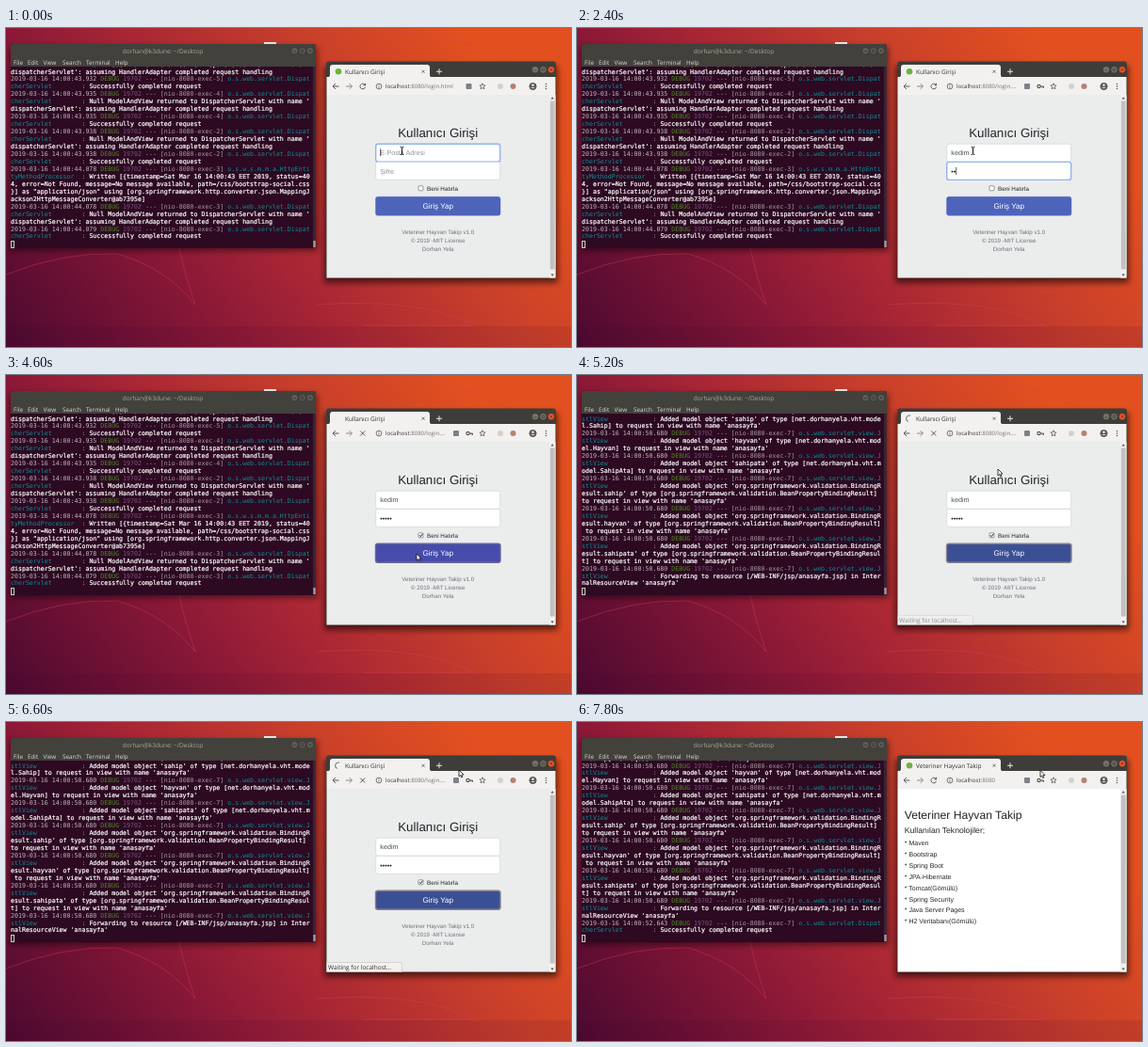
Animation of 600x339 px, one loop 8000 ms. Source, as an HTML page:

```html
<!DOCTYPE html>
<html lang="tr">
<head>
<meta charset="utf-8">
<title>Kullanıcı Girişi</title>
<style>
html, body { margin: 0; width: 100%; height: 100%; overflow: hidden; background: #8c1a3c; }
svg { position: absolute; left: 0; top: 0; width: 600px; height: 339px; }
text { font-family: "Liberation Sans", Arial, sans-serif; fill: #212529; white-space: pre; text-rendering: geometricPrecision; }
.ui { font-family: "Open Sans", "Noto Sans", sans-serif; font-size: 6.5px; fill: #33322f; }
.menu { font-size: 6.3px; fill: #dfdbd2; }
.mid { text-anchor: middle; }
.field { font-size: 7.2px; fill: #495057; }
.foot { font-size: 6.2px; fill: #6c757d; text-anchor: middle; }
.list { font-size: 7px; }
.line { fill: none; stroke: #5a5954; stroke-width: 1; }
#term { position: absolute; left: 5px; top: 41px; width: 321px; height: 193px; overflow: hidden; }
#log { position: absolute; left: 0; bottom: -.4px; margin: 0; color: #fff;
  font: 6.6px/7.95px "DejaVu Sans Mono", "Liberation Mono", monospace; white-space: pre;
  text-rendering: geometricPrecision; }
.msg { -webkit-text-stroke: .2px #fff; }
.time { color: #c3b7be; }
.lv { color: #4f8a25; }
.pid { color: #7d5580; }
.dim { color: #a79aa2; }
.src { color: #0a8f92; }
#log i { display: inline-block; box-sizing: border-box; width: 4px; height: 7.9px; border: .8px solid #ccc; vertical-align: top; }
</style>
</head>
<body>
<svg viewBox="0 0 600 339">
  <defs>
    <linearGradient id="wall" gradientUnits="userSpaceOnUse" x1="0" y1="339" x2="480" y2="0">
      <stop offset="0" stop-color="#4c0930"/>
      <stop offset=".33" stop-color="#8a1837"/>
      <stop offset=".5" stop-color="#a72535"/>
      <stop offset=".75" stop-color="#c73e2b"/>
      <stop offset="1" stop-color="#e2501f"/>
    </linearGradient>
    <filter id="soft" x="-10%" y="-10%" width="120%" height="125%"><feGaussianBlur stdDeviation="3"/></filter>
  </defs>

  <rect width="600" height="339" fill="url(#wall)"/>
  <rect y="317" width="600" height="22" fill="#40002a" opacity=".1"/>
  <g fill="none" stroke="#d8405a" stroke-opacity=".4">
    <path d="M0 262Q60 238 118 240Q170 255 201 294Q190 262 184 234"/>
    <path d="M330 294Q440 286 497 316H380"/>
    <path d="M400 2Q540 8 596 95"/>
  </g>
  <rect x="274" y="15" width="13" height="3" fill="#eee"/>

  <!-- terminal window -->
  <rect x="4" y="20" width="327" height="217" fill="#000" opacity=".45" filter="url(#soft)"/>
  <path d="M5 234V20q0-3 3-3H326q3 0 3 3V234Z" fill="#2d0922"/>
  <path d="M5 41V20q0-3 3-3H326q3 0 3 3V41Z" fill="#42413c"/>
  <rect x="326" y="41" width="3" height="193" fill="#3d2434"/>
  <rect x="326.3" y="226" width="2.4" height="7" fill="#a39aa0"/>
  <text class="ui mid" x="166.500" y="26.500" style="fill:#aaa69c">dorhan@k3dune: ~/Desktop</text>
  <g fill="#5f5d56" stroke="#2f2e2a" stroke-width=".6">
    <circle cx="306.500" cy="24.200" r="3.700"/><circle cx="314.800" cy="24.200" r="3.700"/><circle cx="323" cy="24.200" r="3.700"/>
  </g>
  <path d="M305 24.700h3M313.500 22.900h2.600v2.600h-2.600zM321.800 23l2.400 2.400m0-2.400l-2.400 2.400" fill="none" stroke="#33322e" stroke-width=".7"/>
  <g>
    <text class="ui menu" x="8" y="38.800">File</text><text class="ui menu" x="23" y="38.800">Edit</text>
    <text class="ui menu" x="39.500" y="38.800">View</text><text class="ui menu" x="60" y="38.800">Search</text>
    <text class="ui menu" x="85" y="38.800">Terminal</text><text class="ui menu" x="116" y="38.800">Help</text>
  </g>

  <!-- browser window -->
  <rect x="338" y="40" width="248" height="231" fill="#000" opacity=".55" filter="url(#soft)"/>
  <path d="M340 266V38.500q0-3 3-3H581q3 0 3 3V266Z" fill="#3e3d39"/>
  <path d="M341 52.500q3 0 3-3V42q0-3 3-3H447q3 0 3 3v7.500q0 3 3 3Z" fill="#f2f1f0"/>
  <rect x="340.500" y="52" width="243" height="19" fill="#f2f1f0"/>
  <circle id="fav" cx="353" cy="46.300" r="3.300" fill="#6db33f"/>
  <path id="spin" d="M353 43A3.300 3.300 0 0 0 353 49.600" fill="none" stroke="#6f7277" stroke-width="1"/>
  <text class="ui" id="tab" x="360" y="48.600"></text>
  <path class="line" d="M441.500 44.800l3 3m0-3l-3 3" style="stroke-width:.8"/>
  <path d="M457 46.300h6M460 43.300v6" stroke="#e8e6e2" stroke-width="1"/>
  <g fill="#77746c" stroke="#2b2a27" stroke-width=".6">
    <circle cx="562" cy="44.300" r="3.700"/><circle cx="570.500" cy="44.300" r="3.700"/>
    <circle cx="579" cy="44.300" r="3.700" fill="#e9562a"/>
  </g>
  <path d="M560.500 45h3M569.200 43h2.600v2.600h-2.600zM577.800 43.100l2.400 2.400m0-2.400l-2.400 2.400" fill="none" stroke="#33322e" stroke-width=".7"/>

  <path class="line" d="M353.500 62h-6.500m2.900-2.900l-2.900 2.900l2.900 2.900"/>
  <path class="line" d="M361 62h6.500m-2.900-2.900l2.900 2.900l-2.900 2.900" style="stroke:#8c8b87"/>
  <g id="reload"><path class="line" d="M380.700 60A2.800 2.800 0 1 0 381.500 62.800"/><path d="M382 58.200v3h-3Z" fill="#5a5954"/></g>
  <path id="stop" class="line" d="M376.200 59.500l5 5m0-5l-5 5"/>
  <circle class="line" cx="396" cy="62" r="2.900" style="stroke-width:.8"/>
  <path class="line" d="M396 61.600v2M396 60v.8" style="stroke-width:.8"/>
  <text class="ui" x="403" y="64.300" style="font-size:6.1px">localhost<tspan id="path" fill="#74736f"></tspan></text>
  <rect id="trans" y="59" width="6" height="6" rx="1" fill="#7d8288"/>
  <g id="key"><circle class="line" cx="490.500" cy="62" r="1.600" style="stroke-width:1.200"/><path class="line" d="M492 62h3.500v1.800M494 62v1.500"/></g>
  <path d="M506 58.800l.9 2.100 2.200.2-1.700 1.500.5 2.200-1.900-1.200-1.900 1.200.5-2.200-1.700-1.500 2.200-.2Z" fill="none" stroke="#5a5954" stroke-width=".8"/>
  <circle cx="525" cy="62" r="3" fill="#d3d1ce"/>
  <circle cx="538.500" cy="62" r="3" fill="#b8806c"/>
  <circle class="line" cx="559.500" cy="62" r="3.600" style="fill:#5a5954"/>
  <circle cx="559.500" cy="60.800" r="1.200" fill="#f2f1f0"/><path d="M557.200 64q2.300-2.200 4.600 0Z" fill="#f2f1f0"/>
  <g fill="#5a5954"><circle cx="573.500" cy="59.500" r=".8"/><circle cx="573.500" cy="62" r=".8"/><circle cx="573.500" cy="64.500" r=".8"/></g>

  <rect id="page" x="340.500" y="71" width="243" height="194.500"/>
  <rect x="577" y="71" width="6.500" height="194.500" fill="#f1f1f1"/>
  <rect x="577.800" y="77.500" width="4.900" height="179" fill="#c1c1c1"/>
  <path d="M578.500 75.500l1.700-2.200 1.700 2.200ZM578.500 261.500l1.700 2.200 1.700-2.200Z" fill="#55534f"/>

  <g id="login">
    <text class="mid" x="458.700" y="115.800" font-size="13.300">Kullanıcı Girişi</text>
    <rect class="box" x="392.700" y="123.200" width="132" height="19" rx="2.500" fill="#fff"/>
    <rect class="box" x="392.700" y="142.400" width="132" height="19" rx="2.500" fill="#fff"/>
    <text class="field" id="user" x="397.300" y="134.700"></text>
    <text class="field" id="pass" x="397.300" y="154.500"></text>
    <rect id="caret" width=".8" height="8" fill="#333"/>
    <rect x="438" y="167.800" width="5" height="5" rx=".7" fill="#fff" stroke="#6d7073" stroke-width=".7"/>
    <path id="tick" d="M439 170.300l1.300 1.400 2.100-3" fill="none" stroke="#222" stroke-width="1"/>
    <text x="447" y="172.600" font-size="6.300">Beni Hatırla</text>
    <rect id="btn" x="392.500" y="179.300" width="132.500" height="20" rx="2.500"/>
    <text class="mid" x="458.700" y="192.300" font-size="8.100" style="fill:#fff">Giriş Yap</text>
    <text class="foot" x="458.700" y="219.300">Veteriner Hayvan Takip v1.0</text>
    <text class="foot" x="458.700" y="228.200">© 2019 -MIT License</text>
    <text class="foot" x="458.700" y="237.200">Dorhan Yela</text>
    <g id="drop">
      <rect x="392.500" y="144.500" width="132.500" height="22" fill="#000" opacity=".3" filter="url(#soft)"/>
      <rect x="392.500" y="143.500" width="132.500" height="21.500" rx="1" fill="#fff"/>
      <text class="ui" x="397.300" y="156.800" style="font-weight:700;font-size:7px">kedim</text>
    </g>
    <g id="wait">
      <path d="M340.500 265.500V255.500h78q2 0 2 2V265.500Z" fill="#f2f1f0" stroke="#c4c2be" stroke-width=".6"/>
      <text class="ui" x="342" y="263.200">Waiting for localhost…</text>
    </g>
  </g>

  <g id="home">
    <text x="347.800" y="103.300" font-size="12.150">Veteriner Hayvan Takip</text>
    <text x="347.800" y="118.200" font-size="8.600">Kullanılan Teknolojiler;</text>
  </g>

  <path id="beam" d="M-1.800-4q1.800 0 1.800 1V3q0 1-1.800 1M1.800-4q-1.800 0-1.800 1M1.800 4q-1.800 0-1.800-1" fill="none" stroke="#111" stroke-width="1"/>
  <path id="arrow" d="M0 0V7L1.600 5.500 2.700 8 3.900 7.500 2.800 5.100 5 5Z" fill="#fff" stroke="#111" stroke-width=".8"/>
</svg>
<div id="term"><pre id="log"></pre></div>

<script>
const $ = id => document.getElementById(id);
const LOOP = 8000, TICK = 200, COLS = 80;
const NAME = 'kedim';

// ---- terminal log
const entry = (time, thread, logger, msg) => [
  ['time', `2019-03-16 14:00:${time} `], ['lv', 'DEBUG '], ['pid', '19702 '],
  ['dim', `--- [nio-8080-exec-${thread}] `], ['src', logger.padEnd(40)], ['dim', ' : '], ['msg', msg]
];
function render(parts) {
  let col = 0;
  return parts.map(([cls, text]) => {
    let out = '';
    for (const ch of text) {
      if (col === COLS) { out += '\n'; col = 0; }
      out += ch;
      col++;
    }
    return `<span class="${cls}">${out}</span>`;
  }).join('') + '\n';
}
const servlet = 'o.s.web.servlet.DispatcherServlet';
const done = (time, n) => entry(time, n, servlet, 'Successfully completed request');
const empty = (time, n) => entry(time, n, servlet, "Null ModelAndView returned to DispatcherServlet " +
  "with name 'dispatcherServlet': assuming HandlerAdapter completed request handling");
const view = msg => entry('50.680', 7, 'o.s.web.servlet.view.JstlView', msg);
const added = (name, type) => view(`Added model object '${name}' of type [${type}] to request in view with name 'anasayfa'`);

const models = ['Sahip', 'Hayvan', 'SahipAta'];
const valid = 'org.springframework.validation.';
const before = [
  empty('43.932', 5), done('43.932', 5), empty('43.935', 4), done('43.935', 4),
  empty('43.938', 2), done('43.938', 2),
  entry('44.078', 3, 'o.s.w.s.m.m.a.HttpEntityMethodProcessor',
    'Written [{timestamp=Sat Mar 16 14:00:43 EET 2019, status=404, error=Not Found, ' +
    'message=No message available, path=/css/bootstrap-social.css}] as "application/json" using ' +
    '[org.springframework.http.converter.json.MappingJackson2HttpMessageConverter@ab7395e]'),
  empty('44.078', 3), done('44.079', 3)
];
const posted = [
  ...models.map(m => added(m.toLowerCase(), 'net.dorhanyela.vht.model.' + m)),
  ...models.map(m => added(`${valid}BindingResult.${m.toLowerCase()}`, valid + 'BeanPropertyBindingResult')),
  view("Forwarding to resource [/WEB-INF/jsp/anasayfa.jsp] in InternalResourceView 'anasayfa'")
];
const logs = [before, posted, [...posted, done('52.643', 7)]]
  .map(list => list.map(render).join('') + '<i></i>');

// ---- home page list
['Maven', 'Bootstrap', 'Spring Boot', 'JPA-Hibernate', 'Tomcat(Gömülü)', 'Spring Security',
  'Java Server Pages', 'H2 Veritabanı(Gömülü)'].forEach((item, i) => {
  const row = document.createElementNS('http://www.w3.org/2000/svg', 'text');
  row.setAttribute('class', 'list');
  row.setAttribute('x', 347.8);
  row.setAttribute('y', 131 + i * 11.9);
  row.textContent = '* ' + item;
  $('home').append(row);
});

// ---- pointer path: time, x, y
const route = [
  [0, 420.5, 130.5], [3400, 420.5, 130.5], [3800, 439, 168], [4000, 439, 168], [4400, 436, 190],
  [4800, 436, 190], [5000, 441, 150], [5200, 447, 100], [5600, 460, 78], [6000, 472, 62],
  [6600, 481, 51], [7000, 482, 51], [7800, 492, 51.5], [LOOP, 492, 51.5]
];
function pointer(t) {
  const i = route.findIndex(p => p[0] > t);
  const [a, b] = [route[i - 1], route[i]];
  const k = (t - a[0]) / (b[0] - a[0]);
  return [a[1] + (b[1] - a[1]) * k, a[2] + (b[2] - a[2]) * k];
}

const clamp = (v, max) => Math.max(0, Math.min(max, v));
const show = (id, on) => { $(id).style.display = on ? '' : 'none'; };
const set = (id, attrs) => { for (const k in attrs) $(id).setAttribute(k, attrs[k]); };
const typed = (t, start, max) => clamp(Math.floor((t - start) / TICK) + 1, max);
const boxes = document.querySelectorAll('.box');
let logNow = -1;

function draw(t) {
  const loading = t >= 4600 && t < 7000, home = t >= 7000, saved = t >= 2200;
  const focus = t < 1800 ? 0 : t < 4000 ? 1 : -1;

  const n = typed(t, 800, 5);
  $('user').textContent = n ? NAME.slice(0, n) : 'E-Posta Adresi';
  $('user').style.fill = n ? '' : '#8d949a';
  const dots = t >= 2800 ? 5 : typed(t, 2200, 3);
  $('pass').textContent = dots ? '•'.repeat(dots) : 'Şifre';
  $('pass').style.fill = dots ? '#222' : '#8d949a';
  boxes.forEach((b, i) => {
    b.setAttribute('stroke', i === focus ? '#8fb4ee' : '#d0d4d8');
    b.setAttribute('stroke-width', i === focus ? 1.4 : .7);
  });

  show('caret', t < 200 || (t >= 800 && t < 3400));
  const len = focus ? dots && $('pass').getComputedTextLength() : n && $('user').getComputedTextLength();
  set('caret', { x: 397.3 + len, y: focus ? 148 : 128.3 });

  show('drop', t >= 800 && t < 1800);
  show('tick', t >= 4000);
  const state = t >= 4800 ? 2 : t >= 4200 ? 1 : 0;
  set('btn', {
    fill: ['#4d64ba', '#464cac', '#3b4f95'][state],
    stroke: ['#4d64ba', '#6a6790', '#86828c'][state],
    'stroke-width': state ? 1.4 : .4
  });

  show('login', !home);
  show('home', home);
  $('page').setAttribute('fill', home ? '#fff' : '#ebecec');
  set('wait', { opacity: clamp((t - 5000) / 400, 1) });
  show('fav', !loading);
  show('spin', loading && t >= 4800);
  set('spin', { transform: `rotate(${-(t - 5200) / 1400 * 360 + 20} 353 46.3)` });
  show('reload', !loading);
  show('stop', loading);
  show('key', saved);
  set('trans', { x: saved ? 475 : 488.5 });
  $('tab').textContent = home ? 'Veteriner Hayvan Takip' : 'Kullanıcı Girişi';
  $('path').textContent = ':8080' + (home ? '' : saved ? '/login.…' : '/login.html');

  const log = home ? 2 : t >= 5000 ? 1 : 0;
  if (log !== logNow) $('log').innerHTML = logs[logNow = log];

  const [x, y] = pointer(t);
  const beam = y > 123 && y < 161;
  show('beam', beam);
  show('arrow', !beam);
  set(beam ? 'beam' : 'arrow', { transform: `translate(${x} ${y})` });
}

const start = performance.now();
function frame() {
  const t = (performance.now() - start) % LOOP;
  draw(Math.floor(t / TICK) * TICK);
  requestAnimationFrame(frame);
}
frame();
</script>
</body>
</html>
```
